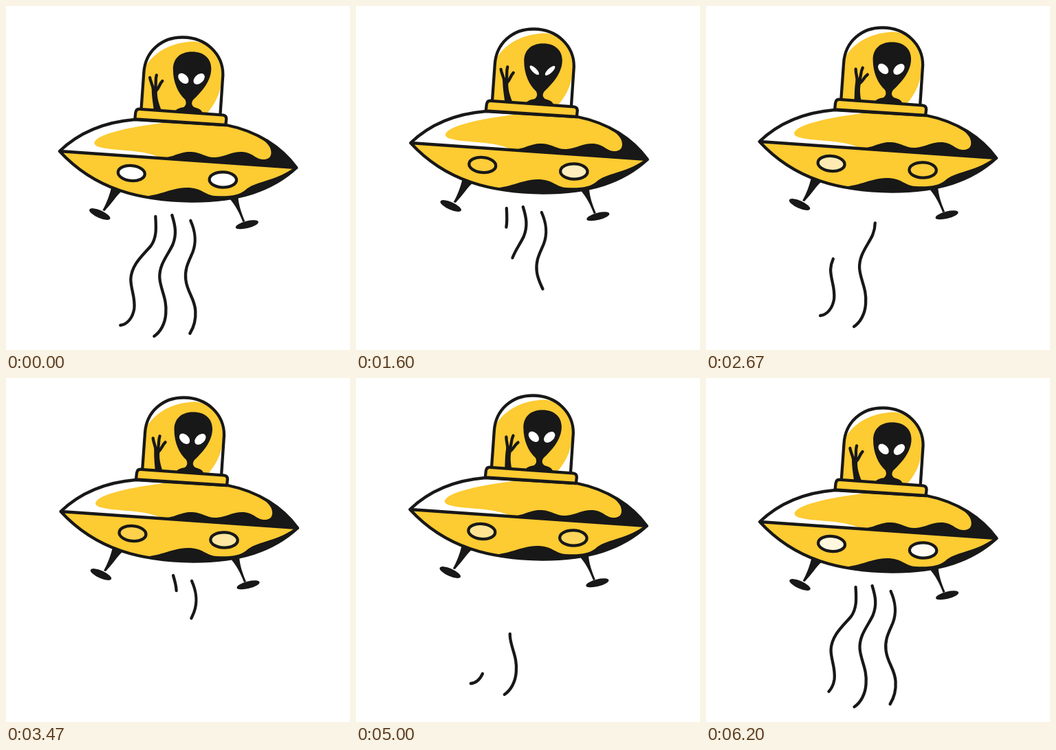
An HTML page for the animation above (6.27 s loop, 500x500 px).

```html
<!DOCTYPE html>
<html lang="en">
<head>
<meta charset="utf-8">
<title>Waving alien in a saucer</title>
<style>
  html, body { margin: 0; width: 100%; height: 100%; overflow: hidden; background: #fff; }
  svg { display: block; width: 100%; height: 100%; }
  .ink { fill: #181818; }
  .gold { fill: #fdcb32; }
  .line { fill: none; stroke: #181818; stroke-width: 4.300; stroke-linecap: round; stroke-linejoin: round; }
  .white { fill: #fff; }
</style>
</head>
<body>
<svg viewBox="0 0 500 500">
  <g id="ship">
    <g id="trails" class="line">
      <path pathLength="1" d="M217 306C218 322 219 337 210 349C198 363 182 376 181 397C181 412 188 424 186 440C184 453 176 463 166 464"/>
      <path pathLength="1" d="M241 304C246 320 248 332 242 347C235 362 222 376 223 395C224 412 234 425 232 447C231 462 224 474 215 480"/>
      <path pathLength="1" d="M268 312C275 328 277 342 271 358C265 372 259 382 261 398C263 416 274 425 275 443C276 458 272 468 267 476"/>
    </g>

    <g class="ink">
      <path d="M153 263L168 269C160 276 154 286 143 298L140 297C146 286 150 276 153 263Z"/>
      <ellipse cx="136" cy="302.500" rx="16.500" ry="5.500" transform="rotate(24 136 302.500)"/>
      <path d="M323 278L337 277C338 290 342 301 347 313L344 314C339 301 333 289 323 278Z"/>
      <ellipse cx="350" cy="317.800" rx="17" ry="5.200" transform="rotate(-14 350 317.800)"/>
    </g>

    <path class="white" d="M196 153L200 97C202 66 226 45 257 45.500C291 46 315 70 315 100L311 159Z"/>
    <path class="gold" d="M197 153L201 91C209 74 231 54 271 51.500C297 52 314 76 313.500 107C311 128 303 144 290 158Z"/>
    <g id="arm" class="ink">
      <path d="M215 162C215 146 211 134 211.500 119L220 118C218 132 222 142 225 150L227 162Z"/>
      <path class="line" d="M214 122C213 115 210 111 208.800 104M216 122C219 114 216 108 218.500 100.500M217 124C223 119 222 114 227 109"/>
    </g>
    <path class="ink" d="M270 66.500C288 66.500 298 77 298 91C298 109 284 125 272 136C269 140 269 144 273 147C279 149 285 150 286 158L244 156C246 149 253 148 258 147C262 144 262 140 260 136C250 127 242.500 111 242.500 92C242.500 77 252 66.500 270 66.500Z"/>
    <g class="white">
      <ellipse class="eye" data-at="257.5 105.3 45" rx="9" ry="6"/>
      <ellipse class="eye" data-at="280.3 106 -43" rx="9.500" ry="6.300"/>
    </g>
    <path class="line" d="M196 153L200 97C202 66 226 45 257 45.500C291 46 315 70 315 100L311 159"/>

    <path class="white" d="M77.500 211C110 180 150 168 187 165L320 173C365 182 400 205 422 235Z"/>
    <path class="gold" d="M128 199C130 188 168 177 235 169L320 173C365 182 400 205 422 235L225 221C205 211 182 211 152 208C137 206 128 204 128 199Z"/>
    <path class="ink" d="M226 221C246 219 253 211 269 212C285 213 291 221 304 220C322 218 328 211 344 212C360 214 362 223 374 223C386 223 387 213 383 205C378 196 366 188 345 179C380 190 404 209 422 235Z"/>
    <path class="gold" d="M77.500 211L422 235C386 268 339 283.500 270 283.500C195 283 129 267 77.500 211Z"/>
    <path class="ink" d="M192 277C222 277 236 265 262 264C285 264 288 275 304 276C326 277 338 275 347 268C362 254 388 256 417 236L422 235C386 268 339 283.500 270 283.500C240 283 214 280 192 277Z"/>
    <path class="line" d="M77.500 211C110 180 150 168 187 165L320 173C365 182 400 205 422 235C386 268 339 283.500 270 283.500C195 283 129 267 77.500 211L422 235"/>
    <path class="line" style="fill:#fdcb32" d="M194 149.800L314 158.300Q320 158.800 320 164L319 173L187 164.500L188 155Q189 149.300 194 149.800Z"/>

    <g class="lamps line">
      <ellipse cx="182" cy="243" rx="19.500" ry="11" transform="rotate(5 182 243)"/>
      <ellipse cx="315" cy="252.500" rx="19.700" ry="11.200" transform="rotate(1 315 252.500)"/>
    </g>
  </g>
</svg>
<script>
  const LOOP = 6270, STEPS = 94, CYCLE = 50;
  const all = q => [...document.querySelectorAll(q)];
  const ship = document.getElementById('ship');
  const arm = document.getElementById('arm');
  const trails = all('#trails path'), lamps = all('.lamps ellipse'), eyes = all('.eye');

  // Each key list is [tick, value, tick, value, ...] over one 50-tick cycle.
  const BOB = [0, 0, 25, -25, 50, 0];
  const WAVE = [0, 0, 12, 1, 25, 1, 37, 0];
  const BLINK = [33, 1, 36, .1, 40, 1];
  const LAMPS = [[0, 1, 37.5, 0, 50, 1], [0, 1, 12.5, 0, 50, 1]];
  const TRAILS = [
    { hide: [6.6, 0, 22, 1], show: [36, 0, 49, 1] },
    { hide: [11.7, 0, 28.4, 1], show: [31, 0, 47.6, 1] },
    { hide: [0, 0, 13, 1], show: [28.3, 0, 42.6, 1] }
  ];

  function at(keys, s) {
    if (s <= keys[0]) return keys[1];
    for (let i = 2; i < keys.length; i += 2) {
      if (s <= keys[i]) {
        const k = (s - keys[i - 2]) / (keys[i] - keys[i - 2]);
        return keys[i - 1] + (keys[i + 1] - keys[i - 1]) * k;
      }
    }
    return keys[keys.length - 1];
  }

  function trim(path, from, to) {
    path.style.visibility = to - from > .002 ? 'visible' : 'hidden';
    path.setAttribute('stroke-dasharray', `${to - from} 3`);
    path.setAttribute('stroke-dashoffset', -from);
  }

  function draw(ms) {
    const step = Math.floor((ms % LOOP + 4) * STEPS / LOOP) % STEPS;
    const s = Math.floor(step * 1.6 + 1e-6) % CYCLE;

    const drift = .9 - 1.1 * Math.cos(2 * Math.PI * (s - 8) / CYCLE);
    ship.setAttribute('transform', `translate(${drift} ${at(BOB, s)})`);

    const wave = at(WAVE, s);
    arm.setAttribute('transform', `translate(0 ${3 * wave}) rotate(${9.5 * wave} 221 156)`);

    const open = at(BLINK, s);
    eyes.forEach(eye => {
      const [x, y, turn] = eye.dataset.at.split(' ');
      eye.setAttribute('transform', `translate(${x} ${y}) rotate(${turn}) scale(1 ${open})`);
    });

    lamps.forEach((lamp, i) => {
      lamp.style.fill = `rgba(255,255,255,${at(LAMPS[i], s)})`;
    });

    trails.forEach((path, i) => {
      const { hide, show } = TRAILS[i];
      if (s < show[0]) trim(path, at(hide, s), 1);
      else trim(path, 0, at(show, s));
    });
  }

  const start = performance.now();
  function tick() {
    draw(performance.now() - start);
    requestAnimationFrame(tick);
  }
  draw(0);
  requestAnimationFrame(tick);
</script>
</body>
</html>
```
